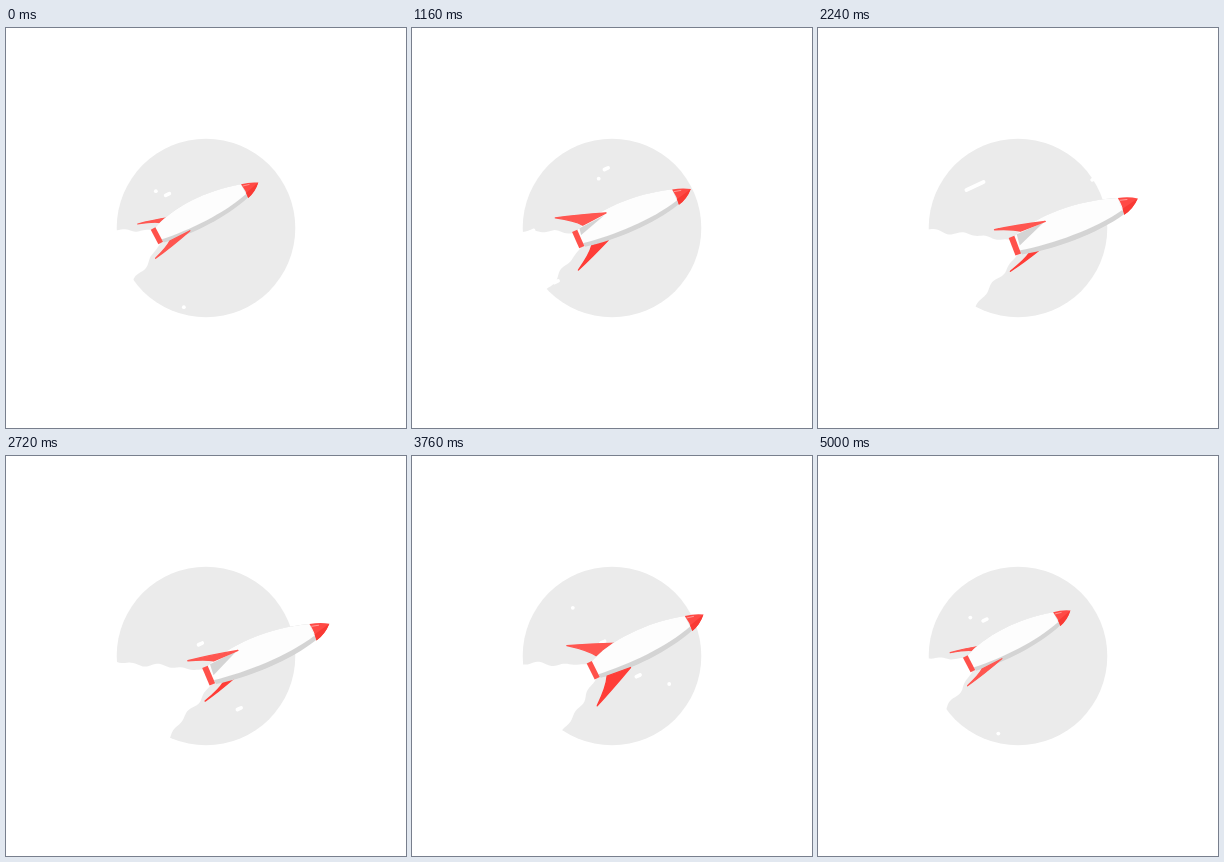
Animation of 400 by 400 pixels, one loop 5040 ms. Source, as an HTML page with a canvas:

```html
<!DOCTYPE html>
<html>
<head>
<meta charset="utf-8">
<style>
  html, body { margin: 0; width: 100%; height: 100%; overflow: hidden; background: #fff; }
  canvas { display: block; }
</style>
</head>
<body>
<canvas id="stage" width="400" height="400"></canvas>
<script>
const ctx = document.getElementById('stage').getContext('2d');
const LOOP = 5040, STEP = 40;

// time, tail x/y, nose x/y, roll, smoke: upper edge y, lower edge end x/y
const keys = [
  [0, 151, 208, 252.5, 155, -1, 202, 128, 252],
  [680, 152, 208, 257, 157, 0, 202, 128, 252],
  [1120, 165, 211, 277, 161, .6, 202, 134, 259],
  [1600, 182, 214, 302, 167, 1, 202, 147, 271],
  [2240, 197, 218, 320, 171, 1, 201, 157, 277],
  [2760, 203, 220, 323.5, 168, 1, 206, 163, 280],
  [3160, 201.5, 219, 318, 165, .8, 209, 168, 283],
  [3960, 174, 213, 282, 157, -.5, 207, 146, 269],
  [4360, 159, 210, 261, 154, -.95, 206, 134, 260]
];

const DOT = 0, SHORT = 4, LONG = 19;
const speeds = { [DOT]: [-62, 40], [SHORT]: [-137, 62], [LONG]: [-250, 118] };

// length, time, x, y, optional velocity in px/s
const stars = [
  [DOT, 680, 227, 143, [-84, 16]],
  [DOT, 1600, 255, 212, [-120, 55]],
  [DOT, 3160, 216, 123, [-92, 48]],
  [DOT, 4360, 192, 136],
  [DOT, 4360, 220, 252],
  [SHORT, 680, 210, 224],
  [SHORT, 1600, 134, 168],
  [SHORT, 2240, 276, 151, [-170, 77]],
  [SHORT, 3160, 188, 135],
  [SHORT, 3160, 273, 149],
  [SHORT, 3160, 173, 280],
  [SHORT, 4360, 144, 257],
  [SHORT, 5000, 167, 164],
  [LONG, 680, 233, 150],
  [LONG, 2240, 157, 158],
  [LONG, 4360, 185, 213]
];

const hull = new Path2D('M2,-8 C25,-18 65,-18 98,-7 L98,8 C70,15.5 32,15 3,9 Z');
const hullLight = new Path2D('M2,-8 C25,-18 65,-18 98,-7 L98,4 C70,11 32,10 2,5 Z');
const cone = new Path2D('M98,-7 Q107,-5 114,-.5 Q107,6.5 98,8.5 Q99.5,1 98,-7 Z');
const coneDark = new Path2D('M98.5,3 L114,-.5 Q107,6.5 98,8.5 Z');

function fill(path, color) {
  ctx.fillStyle = color;
  ctx.fill(path);
}

// Periodic smooth interpolation of all key channels
function poseAt(t) {
  const n = keys.length;
  const key = i => keys[(i + n) % n];
  const time = i => key(i)[0] + LOOP * Math.floor(i / n);
  let i = n - 1;
  while (keys[i][0] > t) i--;
  const span = time(i + 1) - time(i), u = (t - time(i)) / span;
  return key(i).slice(1).map((a, j) => {
    const c = j + 1, b = key(i + 1)[c];
    const slope = k => (key(k + 1)[c] - key(k - 1)[c]) / (time(k + 1) - time(k - 1)) * span;
    const v = 1 - u;
    return a * v * v * (1 + 2 * u) + slope(i) * u * v * v
         + b * u * u * (3 - 2 * u) - slope(i + 1) * u * u * v;
  });
}

function drawStars(t) {
  ctx.strokeStyle = '#fff';
  ctx.lineCap = 'round';
  ctx.lineWidth = 3.8;
  for (const [length, at, x, y, velocity = speeds[length]] of stars) {
    const age = ((t - at + LOOP * 1.5) % LOOP - LOOP / 2) / 1000;
    const cx = x + velocity[0] * age, cy = y + velocity[1] * age;
    const dx = length * .45 || .01, dy = length * .215;
    ctx.beginPath();
    ctx.moveTo(cx - dx, cy + dy);
    ctx.lineTo(cx + dx, cy - dy);
    ctx.stroke();
  }
}

// Points along a smoke edge, with bumps drifting away from the rocket
function smokeEdge(x0, y0, x1, y1, t, seed) {
  const length = Math.hypot(x1 - x0, y1 - y0);
  const nx = (y0 - y1) / length, ny = (x1 - x0) / length;
  const phase = t / LOOP * 2 * Math.PI;
  const points = [];
  for (let s = 0; s <= length; s += 2) {
    const bump = Math.min(1, s / 20) *
      (1.3 * Math.sin(s * .25 - phase * 20 + seed) + Math.sin(s * .13 - phase * 11 + seed * 2));
    points.push([x0 + (x1 - x0) * s / length + nx * bump, y0 + (y1 - y0) * s / length + ny * bump]);
  }
  return points;
}

function drawSmoke(t, x, y, upperY, lowerX, lowerY) {
  const upper = smokeEdge(x - 4, y - 6, 106, upperY, t, 1);
  const endX = x + (lowerX - x) * 1.15, endY = y + (lowerY - y) * 1.15;
  const lower = smokeEdge(x + 3, y + 8, endX, endY, t, 4);
  ctx.beginPath();
  for (const p of [...upper.reverse(), ...lower, [endX, 310], [90, 310], [90, upperY]]) ctx.lineTo(...p);
  ctx.fillStyle = '#fff';
  ctx.fill();
}

function drawFin(side, reach, root, rootOffset, color) {
  ctx.beginPath();
  ctx.moveTo(-11.5, side * reach);
  ctx.quadraticCurveTo(root / 2 - 8, side * ((reach + rootOffset) / 2 + 1.5), root, side * rootOffset);
  ctx.lineTo(9, side * 10.3);
  ctx.quadraticCurveTo(4, side * (reach * .4 + 6.5), -11.5, side * reach);
  ctx.closePath();
  ctx.fillStyle = ctx.strokeStyle = color;
  ctx.lineWidth = 1.2;
  ctx.lineJoin = 'round';
  ctx.fill();
  ctx.stroke();
}

function drawRocket(x, y, noseX, noseY, roll) {
  const dx = noseX - x, dy = noseY - y, scale = Math.hypot(dx, dy) / 114;
  const r2 = roll * roll, rootOffset = 13 - 2.5 * r2;
  const light = '#ff5650', dark = '#ff3d37';
  const upperFin = () => drawFin(-1, 32 - 12.5 * r2, 32 + 6 * roll - 6 * r2, rootOffset, light);
  const lowerFin = () => drawFin(1, 31 - 12 * r2, 31 - 6 * roll - 5.5 * r2, rootOffset, roll < -.5 ? light : dark);
  ctx.save();
  ctx.translate(x, y);
  ctx.rotate(Math.atan2(dy, dx));
  ctx.scale(scale, scale);
  if (roll > 0) lowerFin(); else upperFin();
  fill(hull, '#d4d4d4');
  fill(hullLight, '#fdfdfd');
  if (roll > 0) {
    fill(new Path2D(`M5,-9 L31,-10.5 L4,${-9 + 10 * roll} Z`), '#d4d4d4');
    upperFin();
  } else {
    lowerFin();
  }
  ctx.fillStyle = '#ff514b';
  ctx.fillRect(-2.6, -8.5, 5.2, 16.4);
  fill(cone, '#ff4a45');
  fill(coneDark, '#f93a34');
  ctx.strokeStyle = '#ff9d99';
  ctx.lineWidth = .8;
  ctx.beginPath();
  ctx.moveTo(99, -4.5);
  ctx.lineTo(105, -3);
  ctx.stroke();
  ctx.restore();
}

function draw() {
  const t = Math.floor(performance.now() % LOOP / STEP) * STEP;
  const [x, y, noseX, noseY, roll, ...smoke] = poseAt(t);
  ctx.fillStyle = '#fff';
  ctx.fillRect(0, 0, 400, 400);
  ctx.beginPath();
  ctx.arc(200, 200, 89.3, 0, 2 * Math.PI);
  ctx.fillStyle = '#ebebeb';
  ctx.fill();
  drawStars(t);
  drawSmoke(t, x, y, ...smoke);
  drawRocket(x, y, noseX, noseY, roll);
  requestAnimationFrame(draw);
}
draw();
</script>
</body>
</html>
```
